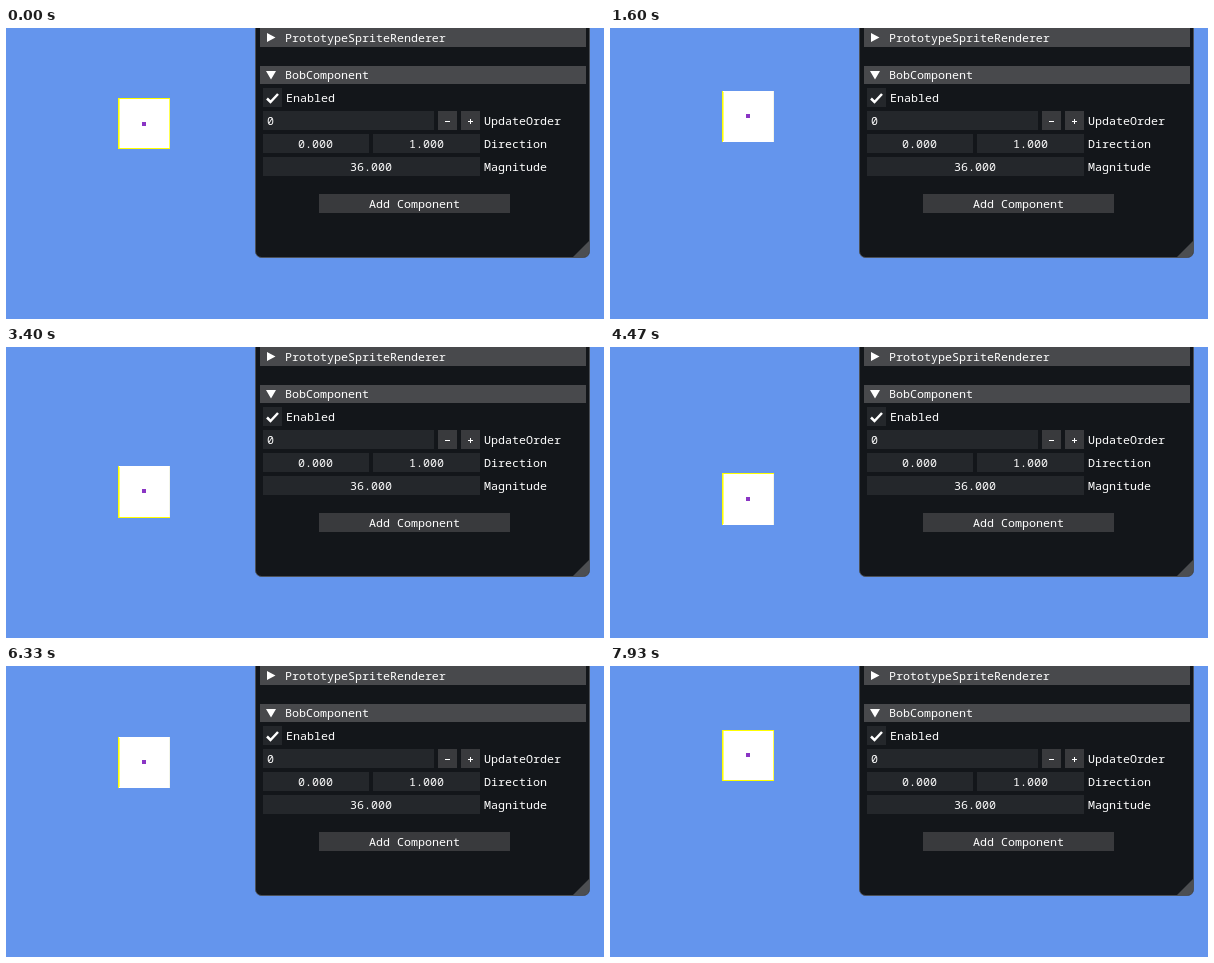
An HTML page that plays this animation: 598 px wide and 291 px high, repeating every 8 s.

```html
<!DOCTYPE html>
<html lang="en">
<head>
<meta charset="utf-8">
<title>Bobbing sprite inspector</title>
<style>
  html, body { margin: 0; width: 100%; height: 100%; overflow: hidden; background: #6495ed; }
  svg { display: block; }
  text { font: 11.67px "Noto Sans Mono", "DejaVu Sans Mono", monospace; fill: #fff; white-space: pre; }
  .header { fill: #48494c; }
  .field { fill: #24272b; }
  .button { fill: #393a3d; }
</style>
</head>
<body>
<svg width="598" height="291" viewBox="0 0 598 291">
  <g id="sprite" shape-rendering="crispEdges">
    <rect id="body" x="112" width="52" rx="1" fill="#fff"/>
    <rect id="left" x="112" width="1" fill="#ff0"/>
    <rect id="leftSoft" x="113" width="1" fill="#ffff70"/>
    <rect id="right" x="163" width="1"/>
    <rect id="top" x="112" width="52" height="1" fill="#ff0"/>
    <rect id="bottom" x="112" width="52" height="1" fill="#ff0"/>
    <rect id="pivot" x="136" width="4" height="4" fill="#8a35c4"/>
  </g>

  <rect x="249.5" y="-10" width="334" height="239.5" rx="6" fill="#13161a" stroke="#4b5058"/>
  <path d="M583 213V224Q583 229 578 229H567Z" fill="#4c4e51"/>

  <g shape-rendering="crispEdges">
    <path class="header" d="M254 0h326v19h-326zM254 38h326v18h-326z"/>
    <path class="field" d="M257 60h19v19h-19zM257 83h171v19h-171zM257 106h106v19h-106zM367 106h107v19h-107zM257 129h217v19h-217z"/>
    <path class="button" d="M432 83h19v19h-19zM455 83h19v19h-19zM313 166h191v19h-191z"/>
  </g>

  <path d="M261 5L269.5 9.5L261 14ZM260 43H270L265 51.5Z" fill="#fff"/>
  <path d="M261 70.5L264.5 74L272 66" fill="none" stroke="#fff" stroke-width="2.5"/>
  <path d="M439 93.5h5M462 93.5h5M464.5 91v5" stroke="#fff"/>

  <text x="279" y="14">PrototypeSpriteRenderer</text>
  <text x="279" y="51">BobComponent</text>
  <text x="280" y="74">Enabled</text>
  <text x="261" y="97">0</text>
  <text x="478" y="97">UpdateOrder</text>
  <text x="292" y="120">0.000</text>
  <text x="403" y="120">1.000</text>
  <text x="478" y="120">Direction</text>
  <text x="344" y="143">36.000</text>
  <text x="478" y="143">Magnitude</text>
  <text x="363" y="180">Add Component</text>
</svg>
<script>
  const LOOP = 8000, FPS = 15, MAGNITUDE = 36, MIDDLE = 118.05, PEAK = 0.99;
  const el = id => document.getElementById(id);
  const set = (id, attrs) => {
    for (const name in attrs) el(id).setAttribute(name, attrs[name]);
  };

  function draw(ms) {
    // The motion is sampled at 15 steps a second; the first step is held.
    const step = Math.max(1, Math.floor((ms + 4) * FPS / 1000));
    const center = MIDDLE - MAGNITUDE * Math.cos(step / FPS - PEAK);
    const y = Math.round(center - 26);
    const height = center < 108 ? 51 : 52;
    const last = y + height - 1;
    // Horizontal outline edges only show on even rows.
    const topOn = y % 2 === 0, bottomOn = last % 2 === 0;

    set("body", { y, height });
    set("left", { y, height });
    set("leftSoft", { y: y + 1, height: height - 2 });
    set("right", { y, height, fill: topOn && bottomOn ? "#ffff50" : "#f3f5ea" });
    set("top", { y, opacity: +topOn });
    set("bottom", { y: last, opacity: +bottomOn });
    set("pivot", { y: Math.floor(center) - 2 });
  }

  const start = performance.now();
  function tick() {
    draw((performance.now() - start) % LOOP);
    requestAnimationFrame(tick);
  }
  tick();
</script>
</body>
</html>
```
